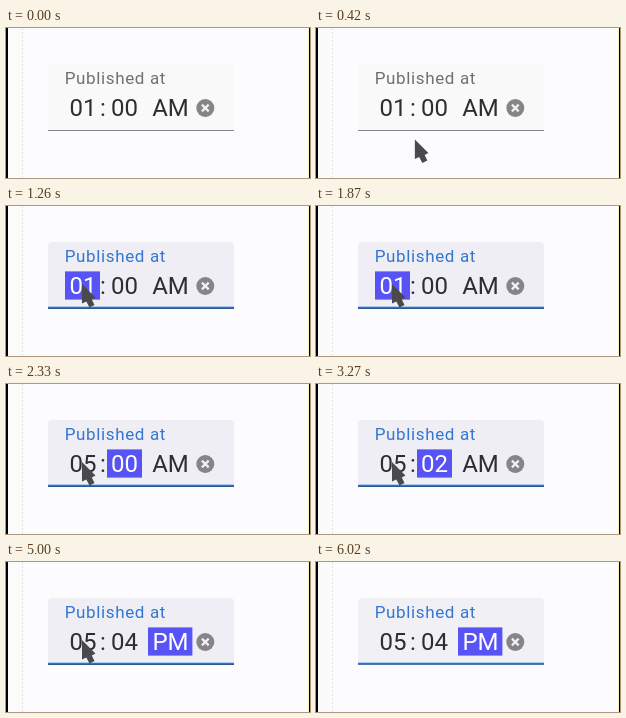
Write an HTML page that moves like this. It is 304 by 150 pixels and loops after 6.06 s.

```html
<!DOCTYPE html>
<html lang="en">
<head>
<meta charset="utf-8">
<title>Time field</title>
<style>
  html, body { margin: 0; width: 100%; height: 100%; overflow: hidden; background: #fcfcff; }
  svg { display: block; width: 304px; height: 150px; font-family: Roboto, sans-serif; }
  .part text { font-size: 24px; text-anchor: middle; fill: #2e2e30; }
  .part rect { y: 65.4px; height: 28.2px; fill: #5853f5; visibility: hidden; }
  .part.on text { fill: #fff; }
  .part.on rect { visibility: visible; }
</style>
</head>
<body>
<svg viewBox="0 0 304 150">
  <rect width="2" height="150" fill="#000"/>
  <rect x="5" width="11" height="150" fill="#fbfbfa"/>
  <path d="M16.5 0V150" stroke="#e2e2ec" stroke-dasharray="2 2"/>
  <path d="M302.5 0V150" stroke="#f6f6b4"/>
  <path d="M303.5 0V150" stroke="#000"/>

  <path id="box" d="M42 102V40Q42 36 46 36H224Q228 36 228 40V102Z"/>
  <rect id="line" x="42" y="102" width="186" height="1"/>
  <rect id="ripple" y="100.7" height="2" fill="#2a74cc"/>
  <text id="label" x="58.7" y="56" font-size="17" letter-spacing=".64">Published at</text>

  <g class="part"><rect x="59" width="35"/><text x="77" y="88">01</text></g>
  <text x="94" y="87.5" font-size="24" fill="#2e2e30">:</text>
  <g class="part"><rect x="101" width="35"/><text x="118.5" y="88">00</text></g>
  <g class="part"><rect x="142" width="44.4"/><text x="164.5" y="88">AM</text></g>

  <circle cx="199.3" cy="80" r="9" fill="#858587"/>
  <path d="M195.9 76.6l6.8 6.8m0-6.8l-6.8 6.8" stroke="#f1f1f5" stroke-width="2.2"/>
  <path id="cursor" d="M0 0V19.5L4.3 17.5L7.5 23.5L12.5 21L9.8 15.5L13.5 13.5Z" fill="#4a4a4c"/>
</svg>
<script>
const LOOP = 6060, FOCUS = 980;
const REST = [76, 78], OUTSIDE = [128, 154];
const $ = id => document.getElementById(id);
const parts = [...document.querySelectorAll('.part')];
const clamp = v => Math.min(1, Math.max(0, v));
const span = (t, from, to) => clamp((t - from) / (to - from));
const smooth = v => v * v * (3 - 2 * v);
const mix = (a, b, v) => a.map((n, i) => n + (b[i] - n) * v);
const rgb = c => `rgb(${c.map(Math.round)})`;

// time of each key press on the minutes
const minuteSteps = [2850, 3270, 3550, 3780];

function draw(t) {
  const away = t < 3000 ? 1 - smooth(span(t, 140, 660)) : smooth(span(t, 5600, 6000));
  const [x, y] = mix(REST, OUTSIDE, away);
  const hover = y < 102;
  const focused = t >= FOCUS;
  const focus = smooth(span(t, FOCUS, FOCUS + 180));

  $('cursor').setAttribute('transform', `translate(${x} ${y})`);
  $('cursor').style.visibility = away < 1 ? 'visible' : 'hidden';

  const idle = hover ? [231, 231, 238] : [249, 249, 250];
  const active = hover ? [238, 238, 244] : [241, 241, 245];
  $('box').style.fill = rgb(mix(idle, active, focus));
  $('line').style.fill = hover ? '#1c1c1c' : '#858585';
  $('label').style.fill = rgb(mix([112, 112, 116], [52, 118, 208], focus));

  // the underline grows from the clicked point
  const left = 80 - 38 * focus, right = 80 + 148 * focus;
  $('ripple').setAttribute('x', left);
  $('ripple').setAttribute('width', right - left);

  const minutes = minuteSteps.filter(s => t >= s).length;
  const texts = [t < 2190 ? '01' : '05', '0' + minutes, t < 4950 ? 'AM' : 'PM'];
  const selected = !focused ? -1 : t < 2190 ? 0 : t < 4250 ? 1 : 2;
  parts.forEach((part, i) => {
    part.classList.toggle('on', i === selected);
    part.lastChild.textContent = texts[i];
  });
}

function tick() {
  draw(performance.now() % LOOP);
  requestAnimationFrame(tick);
}
tick();
</script>
</body>
</html>
```
